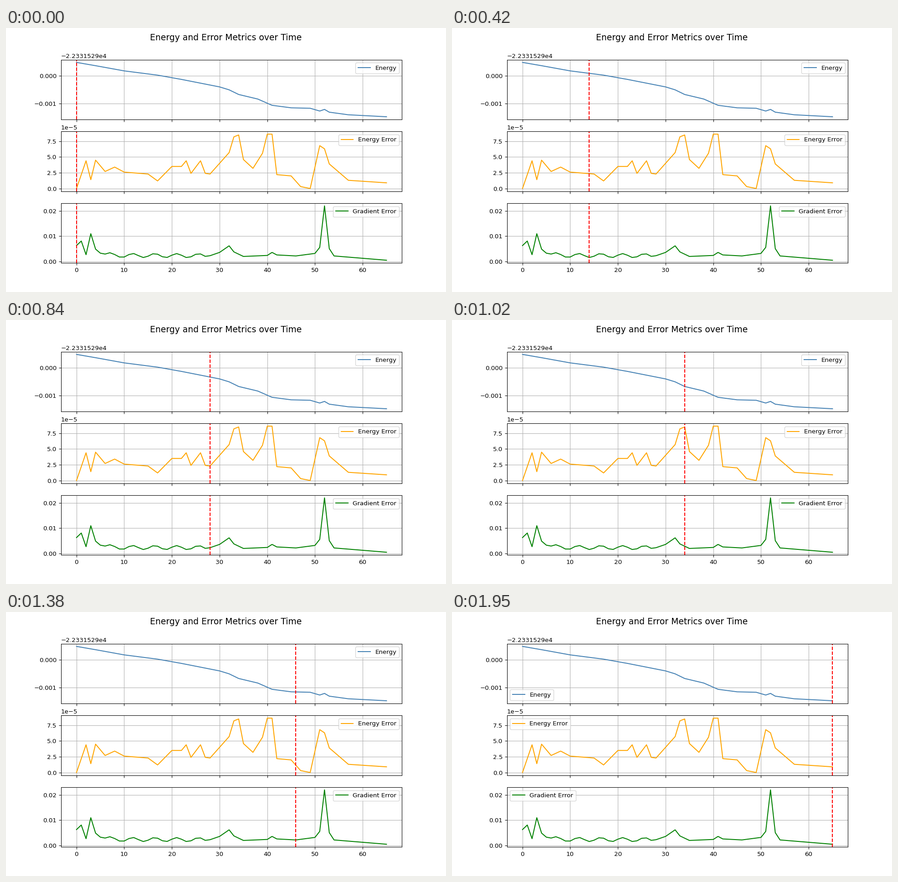
A matplotlib script for the animation above (1.98 s loop, 966x580 px).

```python
import numpy as np
import matplotlib.pyplot as plt
from matplotlib.animation import FuncAnimation
from matplotlib.ticker import ScalarFormatter

STEPS = 66
BASE = -22331.529
x = np.arange(STEPS)


def trace(*knots):
    """Straight segments through (step, value) turning points."""
    return np.interp(x, *zip(*knots))


# Slow descent with a small bump near the end
energy = trace(
    (0, 49), (4, 37.1), (10, 18.4), (17, 3), (22, -12.3), (30, -39.4),
    (32, -49.9), (34, -66.7), (38, -83.1), (41, -105.7), (45, -114.8),
    (49, -116.4), (51, -126.4), (52, -120.5), (53, -130.5), (57, -139.9),
    (65, -147))

energy_error = trace(
    (0, 0), (2, 4.4), (3, 1.4), (4, 4.5), (6, 2.7), (8, 3.4), (10, 2.6),
    (15, 2.3), (17, 1.2), (20, 3.5), (22, 3.5), (23, 4.4), (24, 2.4),
    (26, 4.4), (27, 2.4), (28, 2.3), (32, 5.7), (33, 8.2), (34, 8.5),
    (35, 4.6), (37, 3.2), (39, 5.6), (40, 8.63), (41, 8.63), (42, 2.2),
    (45, 2), (47, 0.3), (49, 0), (51, 6.8), (52, 6.3), (53, 3.9),
    (57, 1.3), (65, 0.9))

# Spikes over a low level, with a regular ripple in the calm stretch
gradient_error = trace(
    (0, 6.3), (1, 8.1), (2, 2.7), (3, 11), (4, 4.9), (5, 3.3), (8, 2.4),
    (28, 2.3), (30, 3.6), (32, 6.2), (33, 3.8), (35, 2), (40, 2.4),
    (41, 3.6), (42, 2.6), (46, 2.2), (50, 3.2), (51, 5.6), (52, 22),
    (53, 5.1), (54, 2.2), (65, 0.5))
calm = (x > 5) & (x < 28)
gradient_error += 0.8 * calm * np.cos(2 * np.pi * (x - 21) / 4.6)

panels = [
    ("Energy", "steelblue", BASE + energy * 1e-5),
    ("Energy Error", "orange", energy_error * 1e-5),
    ("Gradient Error", "green", gradient_error * 1e-3),
]

# 966 x 580 pixels
fig, axes = plt.subplots(3, 1, sharex=True, figsize=(9.9932, 6), dpi=580 / 6)
fig.suptitle("Energy and Error Metrics over Time", fontsize=14)

cursors = []
for ax, (label, color, values) in zip(axes, panels):
    ax.plot(x, values, color=color, label=label)
    cursors.append(ax.axvline(0, color="red", linestyle="--"))
    ax.grid(True)
    # "best" moves the legend away when the cursor reaches it
    ax.legend(loc="best")

axes[0].set_yticks([BASE - 0.001, BASE])
axes[0].yaxis.set_major_formatter(ScalarFormatter(useOffset=BASE))


def update(step):
    for cursor in cursors:
        cursor.set_xdata([step, step])
    return cursors


anim = FuncAnimation(fig, update, frames=STEPS, interval=30,
                     repeat=True, repeat_delay=0, blit=False)
plt.show()
```
